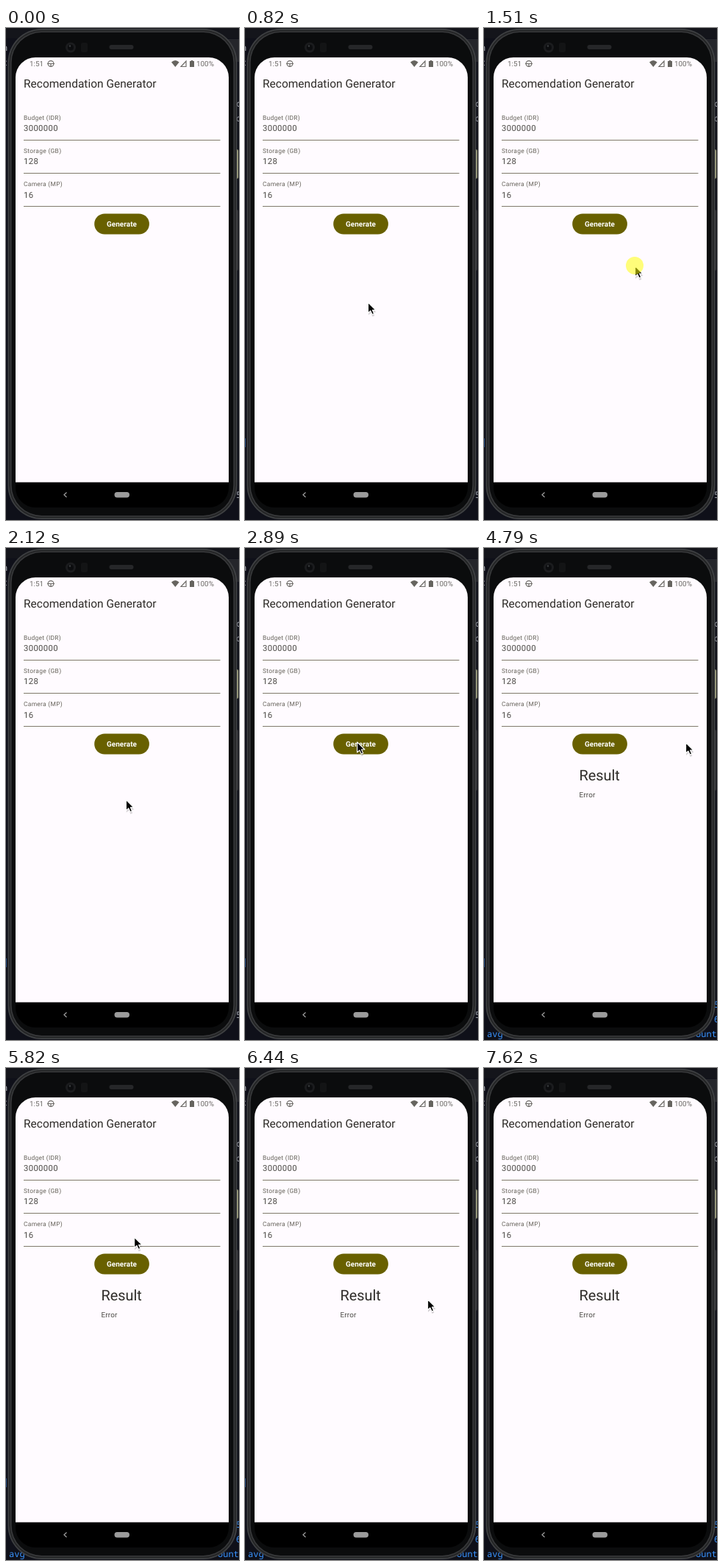
An HTML page that plays this animation: 317 by 669 pixels, repeating every 8790 ms.

```html
<!DOCTYPE html>
<html lang="en">
<head>
<meta charset="utf-8">
<title>Recomendation Generator</title>
<style>
  html, body { margin: 0; width: 100%; height: 100%; overflow: hidden; background: #0f1019; }
  svg { display: block; width: 100%; height: 100%; }
  text { font-family: Roboto, sans-serif; fill: #2e2c28; text-rendering: geometricPrecision; }
  .status { font-size: 9.88px; fill: #6e6c68; }
  .title { font-size: 15.52px; }
  .label { font-size: 8.46px; letter-spacing: .28px; fill: #66635a; }
  .value { font-size: 11.29px; letter-spacing: .35px; fill: #4c4a46; }
  .btn { font-size: 9.88px; font-weight: 600; letter-spacing: .07px; fill: #fff; }
  .head { font-size: 19.9px; }
  .body { font-size: 9.88px; letter-spacing: .18px; fill: #4c4a46; }
  .code text { font: 12px "Noto Sans Mono", "DejaVu Sans Mono", monospace; fill: #a4a7b0; }
  .code .log text { fill: #3a94ff; }
</style>
</head>
<body>
<svg viewBox="0 0 317 669">
  <defs>
    <clipPath id="display"><rect x="13" y="40" width="290" height="612" rx="27"/></clipPath>
  </defs>

  <!-- desktop behind the phone -->
  <rect width="317" height="669" fill="#0f1019"/>
  <path d="M0 0H317V14H0Z" fill="#14151b"/>
  <path d="M300 15H317V46H300Z" fill="#25262b"/>
  <g class="code">
    <g id="editor"></g>
    <g id="idle"><text x="313" y="639">5</text></g>
    <g class="log" id="log1">
      <text x="4" y="659">a</text>
      <text x="304" y="659">36</text>
    </g>
    <g class="log" id="log2">
      <text x="313" y="625">5</text>
      <text x="313" y="645">6</text>
      <text x="4" y="665">avg</text>
      <text x="288" y="665">ount</text>
    </g>
  </g>
  <rect id="mark" y="558" width="1" height="12" fill="#234a7c"/>

  <!-- phone -->
  <rect x="312" y="165" width="4" height="40" rx="2" fill="#b4b58c"/>
  <rect x="312" y="247" width="4" height="83" rx="2" fill="#303134"/>
  <g id="rim"></g>
  <rect x="140.5" y="23" width="33" height="6" rx="3" fill="#262729"/>
  <circle cx="88" cy="26.500" r="7" fill="#1b1c1e"/>
  <circle cx="88" cy="26.500" r="4" fill="#0c0d0f"/>
  <circle cx="87" cy="24.500" r="1.200" fill="#3c3e40"/>
  <rect x="102" y="20" width="9" height="13" rx="2" fill="#131415"/>

  <g clip-path="url(#display)">
    <rect x="13" y="40" width="290" height="612" fill="#000"/>
    <rect x="13" y="40" width="290" height="577.700" fill="#fffbff"/>
    <text class="status" x="32" y="52.300">1:51</text>
    <g fill="none" stroke="#6e6c68" stroke-width="1.200">
      <circle cx="61" cy="48.500" r="3.900"/>
      <path d="M56 48.500H66M61 48.500V53"/>
      <path d="M238 52.500H245V45Z"/>
    </g>
    <g fill="#66645f">
      <path d="M225 46.500Q230.300 41.500 235.600 46.500L230.300 53Z"/>
      <path d="M250 45H251.700V44H254.300V45H256V53H250Z"/>
    </g>
    <text class="status" x="259" y="52.300">100%</text>
    <text class="title" x="24" y="81.300">Recomendation Generator</text>
    <g id="fields"></g>
    <rect x="120.200" y="252.400" width="74.700" height="28.200" rx="14.100" fill="#686000"/>
    <text class="btn" x="157.500" y="270.200" text-anchor="middle">Generate</text>
    <path id="spinner" fill="none" stroke="#686000" stroke-width="2.820"/>
    <g id="result">
      <text class="head" x="129.500" y="316">Result</text>
      <text class="body" x="129.500" y="339.400">Error</text>
    </g>
    <path d="M82.500 631.500L79 634.800L82.500 638" fill="none" stroke="#a0a0a0" stroke-width="1.200"/>
    <rect x="147.500" y="631" width="20.500" height="7.500" rx="3.700" fill="#9b9b9b"/>
  </g>

  <!-- pointer, origin at its hotspot -->
  <g id="pointer">
    <path d="M1 3V18L4.300 15L6.600 20L9.400 18.700L7.200 13.900H11.600Z" fill="#000" opacity=".16"/>
    <path d="M.6 .8V15L3.900 12L6.200 17L8.700 15.900L6.500 11H10.900Z" fill="#000" stroke="#fff" stroke-width="1.100" stroke-linejoin="round"/>
    <circle id="halo" r="12" fill="#ff0" opacity=".52"/>
  </g>
</svg>
<script>
const LOOP = 8790;
const $ = id => document.getElementById(id);
const show = (id, on) => { $(id).style.display = on ? '' : 'none'; };
const within = (t, a, b) => t >= a && t < b;

// one character per editor line
const column = (chars, x, y) => [...chars].map((c, i) =>
  c === ' ' ? '' : `<text x="${x}" y="${y + 20 * i}">${c}</text>`).join('');
$('editor').innerHTML = column('nc           :  :       )', -5, 31) + column('    co', 313, 27);

$('rim').innerHTML = ['#3f4143', '#232425', '#38393b', '#0b0c0d'].map((fill, i) => {
  const d = 1.7 * i;
  return `<rect x="${2.5 + d}" y="${1 + d}" width="${312 - 2 * d}" height="${667 - 2 * d}" rx="${46 - d}" fill="${fill}"/>`;
}).join('');

$('fields').innerHTML = [['Budget (IDR)', '3000000'], ['Storage (GB)', '128'], ['Camera (MP)', '16']]
  .map(([label, value], i) => {
    const y = 45.15 * i;
    return `<text class="label" x="24" y="${125 + y}">${label}</text>
      <text class="value" x="24" y="${140.3 + y}">${value}</text>
      <rect x="24" y="${Math.round(152 + y)}" width="267.500" height="1" fill="#807b6b"/>`;
  }).join('');

// pointer strokes: start, end, points evenly spread over that time
const strokes = [
  [240, 1510, [[29, 413], [80, 412], [150, 385], [194, 358], [158, 491], [205, 323]]],
  [1560, 2700, [[205, 323], [203, 321], [160, 342], [20, 330], [152, 263]]],
  [3550, 3960, [[152, 263], [174, 284], [200, 301]]],
  [4010, 4790, [[200, 301], [250, 286], [274, 264]]],
  [5550, 6440, [[274, 264], [198, 221], [92, 300], [138, 412], [248, 314]]],
  [6490, 6940, [[248, 314], [255, 262], [120, 350], [0, 457]]]
];

// Catmull-Rom curve, at rest at both ends
function curve(points, s) {
  const i = Math.min(Math.floor(s), points.length - 2), u = s - i, v = 1 - u;
  const slope = (j, k) => points[j - 1] && points[j + 1] ? (points[j + 1][k] - points[j - 1][k]) / 2 : 0;
  return [0, 1].map(k =>
    points[i][k] * v * v * (1 + 2 * u) + points[i + 1][k] * u * u * (3 - 2 * u) +
    u * v * (v * slope(i, k) - u * slope(i + 1, k)));
}

function pointerAt(t) {
  const [from, to, points] = strokes.filter(s => s[0] <= t).pop();
  return curve(points, Math.min(1, (t - from) / (to - from)) * (points.length - 1));
}

// cubic-bezier(.4, 0, .2, 1)
function ease(x) {
  if (x <= 0) return 0;
  if (x >= 1) return 1;
  let lo = 0, hi = 1;
  for (let n = 0; n < 20; n++) {
    const s = (lo + hi) / 2, r = 1 - s;
    if (1.2 * s * r * r + .6 * s * s * r + s ** 3 < x) lo = s; else hi = s;
  }
  return lo * lo * (3 - 2 * lo);
}

function arc(t) {
  const cycle = t % 1333 / 1333;
  const head = ease(cycle * 2) * 1.5 * Math.PI;
  const tail = ease(cycle * 2 - 1) * 1.5 * Math.PI;
  const from = -Math.PI / 2 + tail + t / 2222 * 2 * Math.PI + cycle * Math.PI / 2;
  const sweep = Math.max(head - tail, .01);
  const at = a => `${157.5 + 12.7 * Math.cos(a)} ${307 + 12.7 * Math.sin(a)}`;
  return `M${at(from)}A12.7 12.7 0 ${sweep > Math.PI ? 1 : 0} 1 ${at(from + sweep)}`;
}

function draw(t) {
  const loading = within(t, 3550, 4460), moving = within(t, 240, 6940);
  show('spinner', loading);
  if (loading) $('spinner').setAttribute('d', arc(t - 3375));
  show('result', t >= 4460);
  show('idle', t < 4460);
  show('log1', within(t, 3700, 4460));
  show('log2', t >= 4460);
  show('mark', within(t, 70, 7300));
  show('pointer', moving);
  show('halo', within(t, 1310, 1600) || within(t, 3190, 3270));
  if (moving) $('pointer').setAttribute('transform', `translate(${pointerAt(t)})`);
}

const start = performance.now();
function tick() {
  draw((performance.now() - start) % LOOP);
  requestAnimationFrame(tick);
}
tick();
</script>
</body>
</html>
```
